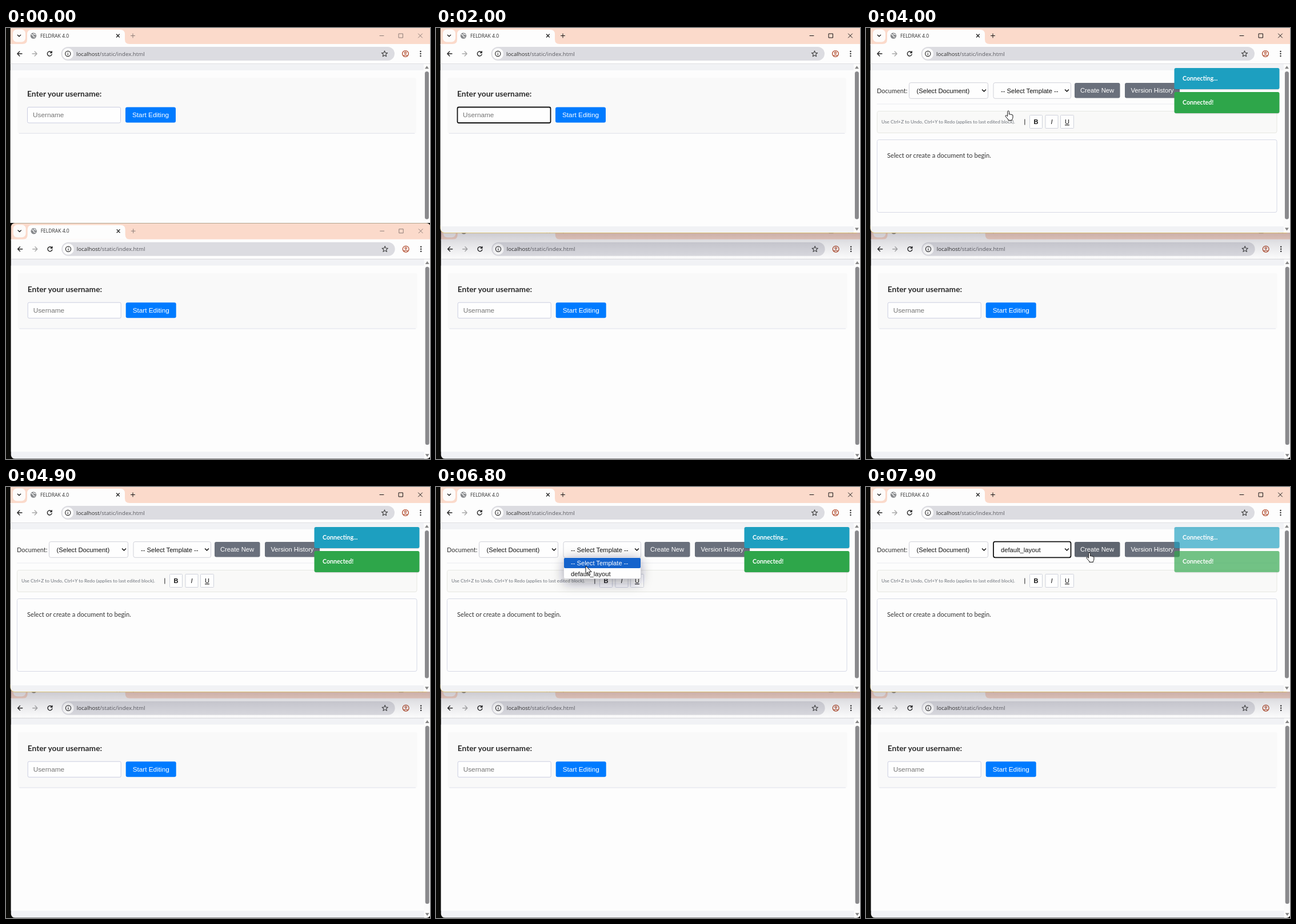
An HTML page for the animation above (8 s loop, 742 px wide and 754 px high).

```html
<!DOCTYPE html>
<html lang="en">
<head>
<meta charset="utf-8">
<title>Document editor</title>
<style>
  html, body { margin: 0; width: 100%; height: 100%; overflow: hidden; background: #0b0b08; }
  svg { display: block; width: 742px; height: 754px; }
  text { white-space: pre; }
  .ui { font-family: "Open Sans", "Noto Sans", sans-serif; }
  .page { font-family: Lato, "Open Sans", sans-serif; }
  .form { font-family: "Liberation Sans", Arial, sans-serif; }
  .b { font-weight: 700; }
  .line { fill: none; stroke-linecap: round; stroke-linejoin: round; }
</style>
</head>
<body>
<svg id="stage" viewBox="0 0 742 754" xmlns="http://www.w3.org/2000/svg"></svg>
<script>
const LOOP = 8000;
const TITLE = 'FELDRAK 4.0';
const USER = 'Peer 4';

// Markup helpers
const rect = (x, y, w, h, fill, r = 0, more = '') =>
  `<rect x="${x}" y="${y}" width="${w}" height="${h}" rx="${r}" fill="${fill}" ${more}/>`;
const path = (d, color, width = 1.3, more = '') =>
  `<path class="line" d="${d}" stroke="${color}" stroke-width="${width}" ${more}/>`;
const disc = (x, y, r, fill, more = '') => `<circle cx="${x}" cy="${y}" r="${r}" fill="${fill}" ${more}/>`;
const text = (x, y, size, cls, fill, str, more = '') =>
  `<text x="${x}" y="${y}" font-size="${size}" class="${cls}" fill="${fill}" ${more}>${str}</text>`;
const group = (id, inner, more = '') => `<g id="${id}" ${more}>${inner}</g>`;
const border = (color, width = 1) => `stroke="${color}" stroke-width="${width}"`;

function tabStrip(id) {
  return rect(7.5, 0, 735, 30, '#fbdacb') +
    rect(12, 2.5, 22, 22, '#fdfbfa', 7) +
    path('M20.3 12.2l2.7 2.6 2.7-2.6', '#222', 1.4) +
    '<path d="M29 28q8 0 8-8v-9q0-8 8-8h155q8 0 8 8v9q0 8 8 8z" fill="#fdfdfd"/>' +
    disc(48, 13.5, 5.2, '#85878a') +
    path('M44.5 11.5q3 0 3 2.2t3 2M48.5 9.5q0 2.2 3.3 2.2', '#f4f4f4', 1.3) +
    text(60, 16.8, 8.55, 'ui', '#2a2a2a', TITLE) +
    path('M193.4 11l5 5m0-5l-5 5', '#222', 1.3) +
    group(id, path('M218.5 13.5h7m-3.5-3.5v7M654 13.5h7M687.5 10h7v7h-7zM721.5 10l7 7m0-7l-7 7', 'currentColor', 1),
      'color="#8d7d77"');
}

function toolbar() {
  const star = Array.from({ length: 10 }, (_, i) => {
    const r = i % 2 ? 2.4 : 5.4, a = i * Math.PI / 5 - Math.PI / 2;
    return (662.5 + r * Math.cos(a)).toFixed(2) + ' ' + (45.3 + r * Math.sin(a)).toFixed(2);
  }).join('L');
  return rect(7.5, 28, 735, 35, '#fdfdfd') +
    path('M28 45h-8m3.8-3.9l-3.9 3.9 3.9 3.9', '#262626', 1.4) +
    path('M46 45h8m-3.8-3.9l3.9 3.9-3.9 3.9', '#a9a9a9', 1.4) +
    path('M79.6 42.7a4 4 0 1 0 .6 3.4M80.2 40.8v2.7h-2.7', '#262626', 1.4) +
    rect(96.5, 33, 583.5, 24, '#dcdce1', 12) +
    disc(108.3, 45, 9.8, '#fdfdfd') +
    disc(108.3, 45, 4.6, 'none', border('#303030', 1.2)) +
    path('M108.3 44.8v2.3M108.3 42.8v.1', '#303030', 1.2) +
    text(123, 48.6, 9.7, 'ui', '#303030', 'localhost<tspan fill="#5c5c62">/static/index.html</tspan>') +
    path(`M${star}Z`, '#444', 1.1) +
    disc(699, 45, 5.4, 'none', border('#b14a2c', 1.3)) +
    disc(699, 43.4, 1.6, 'none', border('#b14a2c', 1.2)) +
    path('M695.4 48.6q3.6-3 7.2 0', '#b14a2c', 1.2) +
    [41, 45, 49].map(y => disc(725.5, y, 1.2, '#262626')).join('') +
    rect(7.5, 62, 735, 1, '#dfdfe2');
}

function scrollbar(thumbEnd, arrowY) {
  return rect(731, 63, 11.5, arrowY - 57, '#fbfbfb') +
    rect(733, 76, 7, thumbEnd - 76, '#8a8a8d', 3.5) +
    `<path d="M733 71.3h7l-3.5-5zM733 ${arrowY - 2.5}h7l-3.5 5z" fill="#858585"/>`;
}

function login(prefix, cardRight) {
  const id = name => `id="${prefix}-${name}"`;
  return rect(20, 87, cardRight - 20, 97.5, '#f9f9f9', 4) +
    path(`M23 184.3H${cardRight - 3}`, '#dfe1ea', 1) +
    text(37, 120, 13.8, 'page b', '#2b2b2b', 'Enter your username:') +
    rect(37.5, 138.5, 163, 27.5, '#fefefe', 2.5, id('input') + border('#cacde0')) +
    text(47, 156.2, 11.8, 'form', '#757575', 'Username', id('value')) +
    rect(209, 138.5, 88, 27, '#007bff', 3, id('start')) +
    text(221, 156.2, 11.75, 'form', '#fff', 'Start Editing');
}

function select(id, x, w, label) {
  return rect(x, 95.7, w, 27.6, '#fefefe', 3, `id="${id}" ` + border('#cfd0d8')) +
    text(x + 13, 113.5, 11.2, 'form', '#111', label, `id="${id}-text"`) +
    path(`M${x + w - 10} 108l3 3 3-3`, '#111', 1.6);
}

function formatButton(x, w, label, more) {
  return rect(x, 152.5, w, 23, '#fefefe', 1, border('#cfd2dc')) +
    text(x + w / 2, 168.2, 11, 'form', '#111', label, 'text-anchor="middle" ' + more);
}

function toast(y, color, label) {
  return rect(540, y + 1.5, 183.5, 37, 'rgba(0,0,0,.12)', 4) +
    rect(539.5, y, 184, 37, color, 3) +
    text(554, y + 22.3, 10.6, 'page b', '#fff', label);
}

function editor() {
  return text(19, 113.7, 11, 'page', '#333', 'Document:') +
    select('doc', 75.5, 138, '(Select Document)') +
    select('tpl', 223, 135.5, '-- Select Template --') +
    rect(365, 96, 79.5, 26.5, '#6a707c', 3, 'id="create"') +
    text(375, 113.3, 11.2, 'form', '#fff', 'Create New') +
    rect(453, 96, 96, 26.5, '#6a707c', 3) +
    text(463.5, 113.3, 11.15, 'form', '#fff', 'Version History') +
    rect(19, 132.5, 700, 1, '#e9ebef') +
    rect(19.5, 145.5, 699.5, 38, '#f9f9f8', 3, border('#e6e7e2')) +
    text(27, 167, 8.3, 'page', '#6d727a', 'Use Ctrl+Z to Undo, Ctrl+Y to Redo (applies to last edited block).') +
    rect(277.3, 159.5, 1.1, 10, '#333') +
    formatButton(286.5, 22, 'B', 'font-weight="700"') +
    formatButton(314, 22, 'I', 'font-style="italic"') +
    formatButton(340.5, 23, 'U', 'text-decoration="underline"') +
    rect(19.5, 195.5, 699.5, 127, '#fdfdfd', 3, border('#d6d9e6')) +
    text(37, 227, 11.15, 'page', '#333', 'Select or create a document to begin.') +
    group('toasts', toast(70, '#1d9fc0', 'Connecting...') + toast(112, '#2ea64a', 'Connected!')) +
    group('menu',
      rect(224, 126, 134, 42, 'rgba(20,20,50,.38)', 6, 'filter="url(#soft)"') +
      rect(223.5, 123, 135, 37.5, '#fefefe', 3, border('#c8c8d0', .6)) +
      rect(224, 124, 134, 18, '#1463cc', 2, 'id="pick"') +
      text(236, 137, 11.15, 'form', '#fff', '-- Select Template --', 'id="opt0"') +
      text(236, 155.5, 11.2, 'form', '#111', 'default_layout', 'id="opt1"'));
}

function browser(id, height, pageEnd, thumbEnd, content) {
  return tabStrip(id) + toolbar() +
    rect(7.5, 63, 735, height - 63, '#f1f2f5') +
    rect(7.5, 74, 724, pageEnd - 74, '#fdfdfd') +
    scrollbar(thumbEnd, height - 6) + content;
}

const arrow = '<path d="M0 0v14.2l3.3-3 2.2 5 2.3-1-2.2-4.9h4.5z" fill="#fff" stroke="#111" stroke-width="1"/>';
const hand = '<path d="M-1.4 8V1.3a1.4 1.4 0 0 1 2.8 0V6q1.3-.9 2.3.2 1.4-.7 2.2.5 1.9-.5 2 1.3v3.2q0 2.2-1.4 3.4v1.8H-.2v-1.5L-4.9 9.6q-.6-1.8 1.1-1.9 1.2.3 2.4 1.7z" fill="#fff" stroke="#111" stroke-width="1"/>';

document.getElementById('stage').innerHTML = `
  <defs>
    <clipPath id="frame"><rect id="frameBox" x="7.5" y="-12" width="747" height="353" rx="0"/></clipPath>
    <clipPath id="lower"><rect x="8" y="-.5" width="734" height="412.5" rx="7"/></clipPath>
    <linearGradient id="fall" x1="0" y1="0" x2="0" y2="1">
      <stop offset="0" stop-color="#281830" stop-opacity=".28"/>
      <stop offset=".45" stop-color="#282840" stop-opacity=".13"/>
      <stop offset="1" stop-color="#303050" stop-opacity="0"/>
    </linearGradient>
    <filter id="soft" x="-30%" y="-60%" width="160%" height="260%"><feGaussianBlur stdDeviation="10"/></filter>
  </defs>` +
  group('back', browser('backCtl', 412, 399.5, 387.5, login('back', 719)) +
    path('M8 -.2H742', '#d9c7ae', 1), 'transform="translate(.7 341.7)" clip-path="url(#lower)"') +
  group('shade', rect(7.5, 350, 735, 56, 'url(#fall)') + rect(7.5, 340, 735, 18.8, '#dfbf58', 8)) +
  group('front', browser('frontCtl', 358, 347, 334.5, group('login', login('front', 718)) + group('editor', editor())),
    'clip-path="url(#frame)"') +
  group('mouse', group('arrow', arrow) + group('hand', hand));

const $ = id => document.getElementById(id);
const set = (id, attrs) => { for (const k in attrs) $(id).setAttribute(k, attrs[k]); };
const show = (id, on) => set(id, { display: on ? 'inline' : 'none' });
const clamp = v => Math.min(1, Math.max(0, v));

// Pointer stops: time, x, y
const moves = [
  [3200, 215, 175], [3500, 249, 145], [6200, 250, 146], [6450, 285, 112], [6600, 280, 118],
  [6800, 262, 138], [7000, 262, 138], [7200, 268, 149], [7400, 268, 149], [7800, 391, 115], [8000, 391, 115]
];

function pointerAt(t) {
  let i = 0;
  while (i < moves.length - 2 && t >= moves[i + 1][0]) i++;
  const [t0, x0, y0] = moves[i], [t1, x1, y1] = moves[i + 1];
  const u = clamp((t - t0) / (t1 - t0)), e = u * u * (3 - 2 * u);
  return [x0 + (x1 - x0) * e, y0 + (y1 - y0) * e];
}

function draw(t) {
  const active = t >= 1700, editing = t >= 3800;
  set('frameBox', { height: active ? 370 : 353, rx: active ? 8 : 0 });
  set('frontCtl', { color: active ? '#151515' : '#8d7d77' });
  show('shade', active);
  show('login', !editing);
  show('editor', editing);

  const typed = USER.slice(0, Math.max(0, Math.floor((t - 2200) / 150)));
  const focused = active && t < 3600;
  const hover = t >= 3400;
  $('front-value').textContent = typed || 'Username';
  set('front-value', { fill: typed ? '#111' : '#757575' });
  set('front-input', { stroke: focused ? '#111' : '#cacde0', 'stroke-width': focused ? 1.8 : 1 });
  set('front-start', { fill: hover ? '#0056b3' : '#007bff' });

  const open = t >= 6500 && t < 7400, chosen = t >= 7400, second = t >= 7100;
  show('menu', open);
  set('pick', { y: second ? 142 : 124 });
  set('opt0', { fill: second ? '#111' : '#fff' });
  set('opt1', { fill: second ? '#fff' : '#111' });
  $('tpl-text').textContent = chosen ? 'default_layout' : '-- Select Template --';
  set('tpl', { stroke: chosen ? '#111' : '#cfd0d8', 'stroke-width': chosen ? 1.8 : 1 });
  set('create', { fill: t >= 7700 ? '#5f656f' : '#6a707c' });
  set('toasts', { opacity: clamp((t - 3700) / 300) * (1 - clamp((t - 7700) / 600)) });

  const [x, y] = pointerAt(t);
  const pointing = (t >= 3400 && t < 4100) || t >= 7700;
  show('mouse', (t >= 3200 && t < 4100) || t >= 6200);
  show('hand', pointing);
  show('arrow', !pointing);
  set('mouse', { transform: `translate(${x.toFixed(1)} ${y.toFixed(1)})` });
}

const start = performance.now();
function tick() {
  const t = (performance.now() - start) % LOOP;
  draw(Math.floor(t / 100) * 100);
  requestAnimationFrame(tick);
}
tick();
</script>
</body>
</html>
```
